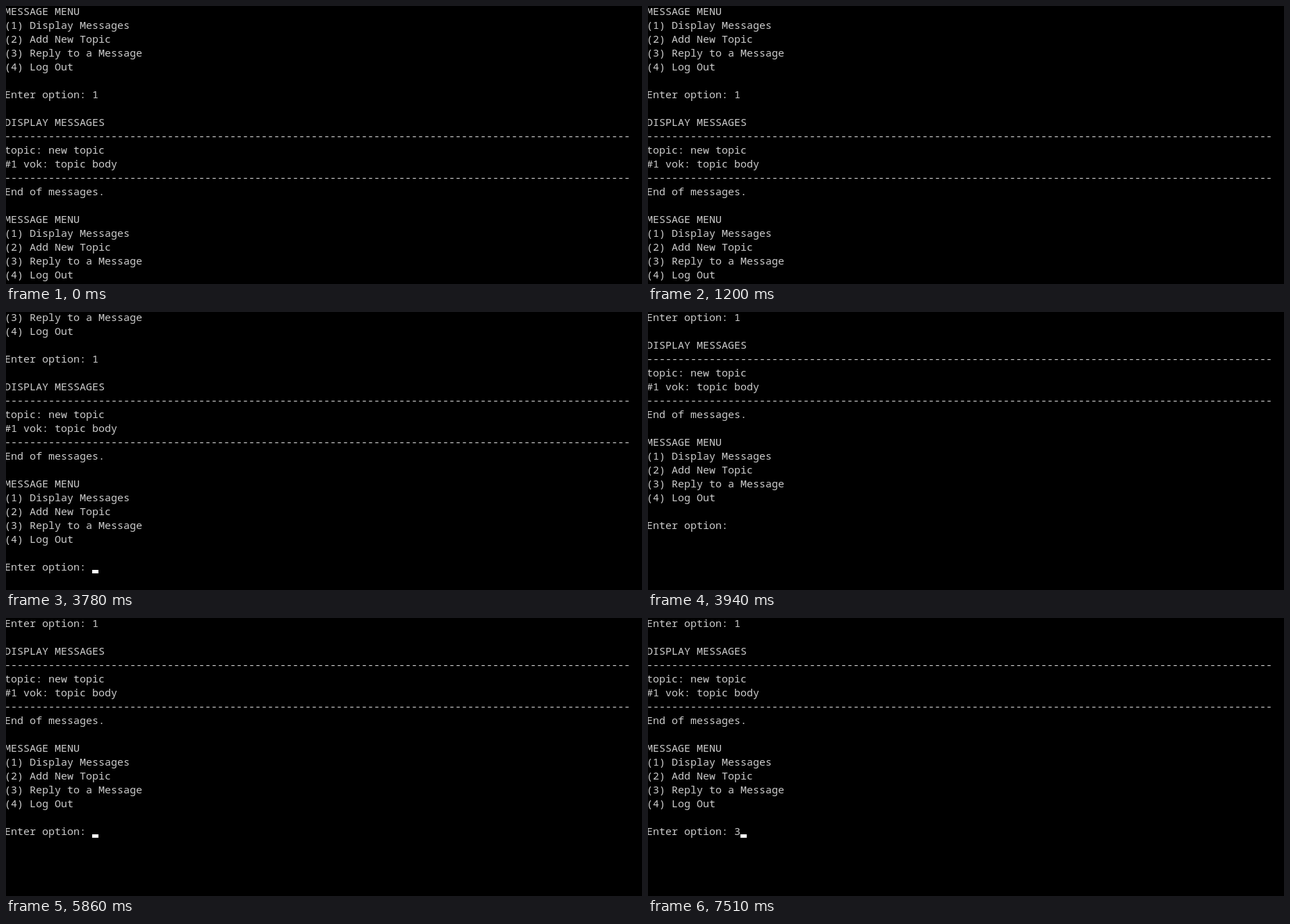
Animation of 915x401 px, one loop 8 s. Source, as an HTML page:

```html
<!DOCTYPE html>
<html lang="en">
<head>
<meta charset="utf-8">
<title>Message menu</title>
<style>
html, body { margin: 0; width: 100%; height: 100%; overflow: hidden; background: #000; }
#stage { position: relative; width: 915px; height: 401px; overflow: hidden; }
#screen { position: absolute; left: -2px; top: -3px; animation: scroll 8s step-end infinite; }
pre { margin: 0; color: #ccc; font: 15px/20px "Noto Sans Mono", "DejaVu Sans Mono", monospace; font-variant-ligatures: none; }
#typed { opacity: 0; animation: type 8s step-end infinite; }
#caret { position: absolute; left: 126px; top: 435px; width: 9px; height: 5px; background: #fff; animation: blink 8s step-end infinite, advance 8s step-end infinite; }
#pointer { position: absolute; left: 911px; top: 29px; width: 4px; height: 20px; background: #fff; clip-path: polygon(0 0, 100% 20%, 100% 80%, 0 100%); opacity: 0; animation: pass 8s step-end infinite; }

@keyframes scroll {
  0% { transform: none; }
  39.125% { transform: translateY(-60px); }
  49.25%, 100% { transform: translateY(-120px); }
}
@keyframes blink {
  0%, 40.375%, 49.25%, 66.5%, 79.75%, 92.625% { opacity: 0; }
  39.125%, 47.25%, 60.125%, 73.25%, 85.875%, 93.875%, 100% { opacity: 1; }
}
@keyframes advance {
  0% { transform: none; }
  93.875%, 100% { transform: translateX(9px); }
}
@keyframes type {
  0% { opacity: 0; }
  93.875%, 100% { opacity: 1; }
}
@keyframes pass {
  0%, 15%, 100% { opacity: 0; }
  14.25% { opacity: 1; }
}
</style>
</head>
<body>
<div id="stage">
  <div id="screen"><pre id="text"></pre><div id="caret"></div></div>
  <div id="pointer"></div>
</div>
<script>
const menu = `MESSAGE MENU
(1) Display Messages
(2) Add New Topic
(3) Reply to a Message
(4) Log Out

Enter option: `;
const rule = "-".repeat(100);

document.getElementById("text").innerHTML = `${menu}1

DISPLAY MESSAGES
${rule}
topic: new topic
#1 vok: topic body
${rule}
End of messages.

${menu}<span id="typed">3</span>`;
</script>
</body>
</html>
```
